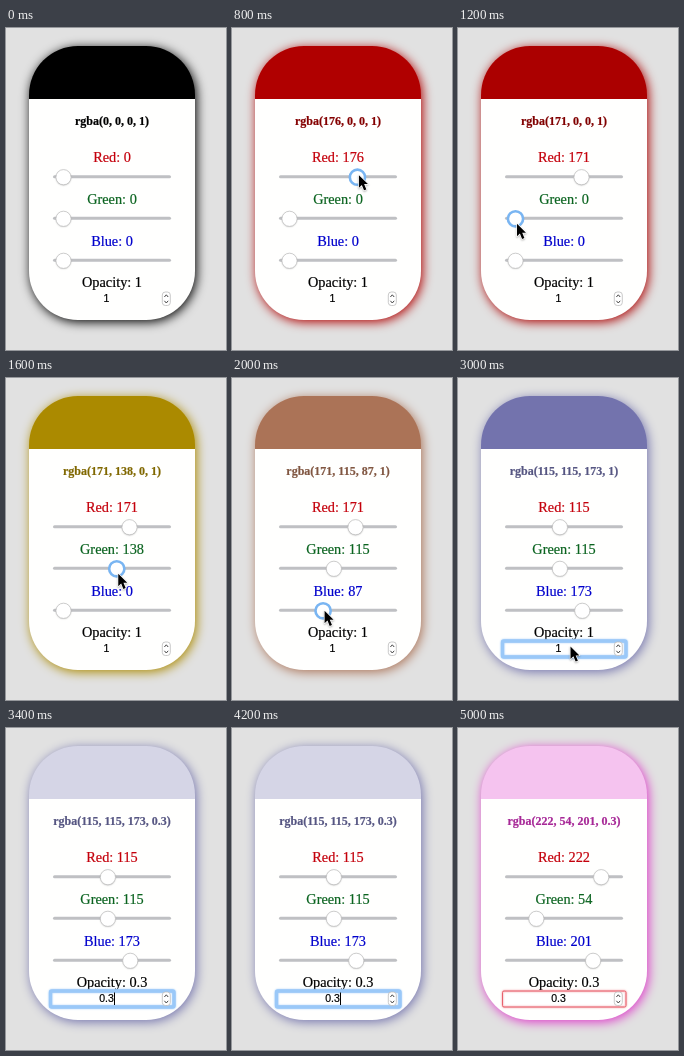
Recreate the animation shown at these times as an HTML page with a canvas. Size 220 px wide and 322 px high, loop 5200 ms.

```html
<!DOCTYPE html>
<html lang="en">
<head>
<meta charset="utf-8">
<title>Colour mixer</title>
<style>
html, body { margin: 0; width: 100%; height: 100%; overflow: hidden; background: #e1e1e1; }
canvas { display: block; width: 220px; height: 322px; }
</style>
</head>
<body>
<canvas id="stage"></canvas>
<script>
const LOOP = 5200, STEP = 200;
const TYPING = 3200, SHUFFLE = 4200, END = 5000;
const SERIF = '"Liberation Serif", Times, serif';
const SANS = '"Liberation Sans", Arial, sans-serif';

const canvas = document.getElementById('stage');
const ctx = canvas.getContext('2d');
const ratio = window.devicePixelRatio || 1;
canvas.width = 220 * ratio;
canvas.height = 322 * ratio;
ctx.scale(ratio, ratio);

// grab: where the pointer holds the thumb, below the track
const red = { label: 'Red', y: 148.7, colour: '#c4000c', grab: -2, last: 222 };
const green = { label: 'Green', y: 190.3, colour: '#0b6420', grab: 5, last: 54 };
const blue = { label: 'Blue', y: 232.3, colour: '#0000cc', grab: 0, last: 201 };
const sliders = [red, green, blue];

const drags = [
  { slider: red, from: 200, to: 800, value: 176 },
  { slider: red, from: 800, to: 1000, value: 171 },
  { slider: green, from: 1200, to: 1600, value: 138 },
  { slider: green, from: 1600, to: 1800, value: 115 },
  { slider: blue, from: 1800, to: 2200, value: 173 },
  { slider: red, from: 2200, to: 2400, value: 173 },
  { slider: red, from: 2400, to: 2800, value: 115 },
  ...sliders.map(slider => ({ slider, from: SHUFFLE, to: END, value: slider.last })),
];

const smooth = p => p * p * (3 - 2 * p);
const progress = (t, from, to) => smooth(Math.min(1, Math.max(0, (t - from) / (to - from))));
const thumbX = value => 57.5 + value * 0.386;

const sliderValue = (slider, t) => Math.round(drags
  .filter(drag => drag.slider === slider)
  .reduce((value, drag) => value + (drag.value - value) * progress(t, drag.from, drag.to), 0));

function draggedSlider(t) {
  const drag = drags.findLast(({ from }) => from < t || from === t && t > 200);
  return drag && drag.slider;
}

function text(string, x, y, font, colour) {
  ctx.font = font;
  ctx.fillStyle = ctx.strokeStyle = colour;
  ctx.lineWidth = 0.2;
  ctx.textAlign = 'center';
  ctx.fillText(string, x, y);
  ctx.strokeText(string, x, y);
}

function roundRect(x, y, w, h, r) {
  ctx.beginPath();
  ctx.roundRect(x, y, w, h, r);
}

function withShadow(colour, blur, dx, dy, paint) {
  ctx.save();
  ctx.shadowColor = colour;
  ctx.shadowBlur = blur * ratio;
  ctx.shadowOffsetX = dx * ratio;
  ctx.shadowOffsetY = dy * ratio;
  paint();
  ctx.restore();
}

function card(rgb, alpha) {
  const header = rgb.map(v => Math.round(255 + (v - 255) * alpha));
  const fill = ctx.createLinearGradient(0, 18, 0, 292);
  const edge = 53 / 274;
  fill.addColorStop(0, `rgb(${header})`);
  fill.addColorStop(edge, `rgb(${header})`);
  fill.addColorStop(edge, '#fffffe');
  roundRect(23, 18, 166, 274, 49);
  ctx.fillStyle = fill;
  withShadow(`rgb(${rgb})`, 11, 1.5, 2, () => ctx.fill());
}

function drawSlider({ label, y, colour }, value, focused) {
  text(`${label}: ${value}`, 106, y - 14.5, `14.3px ${SERIF}`, colour);
  roundRect(47, y - 1.5, 118, 3, 1.5);
  ctx.fillStyle = '#bfc0c3';
  ctx.fill();
  ctx.beginPath();
  ctx.arc(thumbX(value), y + 0.5, 7.6, 0, Math.PI * 2);
  ctx.fillStyle = '#fff';
  withShadow('rgba(0,0,0,.25)', 1.5, 0, 0.6, () => ctx.fill());
  ctx.strokeStyle = focused ? '#79b5f2' : '#c2c2c2';
  ctx.lineWidth = focused ? 2.6 : 0.8;
  ctx.stroke();
}

function chevron(y, dir) {
  ctx.beginPath();
  ctx.moveTo(158.4, y);
  ctx.lineTo(160.3, y + 2.2 * dir);
  ctx.lineTo(162.2, y);
  ctx.strokeStyle = '#444';
  ctx.lineWidth = 1;
  ctx.stroke();
}

function fieldRing(colour, width) {
  roundRect(44.5, 263, 123.5, 16, 1.5);
  ctx.fillStyle = '#fff';
  ctx.fill();
  ctx.strokeStyle = colour;
  ctx.lineWidth = width;
  withShadow(colour, 2, 0, 0, () => ctx.stroke());
}

function numberField(value, caret) {
  text(value, 100.5, 274, `10.5px ${SANS}`, '#000');
  if (caret) {
    ctx.fillStyle = '#000';
    ctx.fillRect(108, 264.5, 1, 12.5);
  }
  roundRect(156.3, 264, 8, 13.5, 3);
  ctx.fillStyle = '#fff';
  ctx.fill();
  ctx.strokeStyle = '#bbb';
  ctx.lineWidth = 0.8;
  ctx.stroke();
  chevron(269, -1);
  chevron(272.8, 1);
}

function cursor(x, y) {
  ctx.save();
  ctx.translate(x, y);
  ctx.fillStyle = '#000';
  ctx.strokeStyle = '#fff';
  ctx.lineWidth = 1.4;
  ctx.lineJoin = 'round';
  const arrow = new Path2D('M0.5 0.5V13L3.4 10.3L5.6 15.6L7.9 14.7L5.7 9.4H9.5Z');
  withShadow('rgba(0,0,0,.3)', 2, 0, 1, () => ctx.stroke(arrow));
  ctx.fill(arrow);
  ctx.restore();
}

function draw(now) {
  const t = Math.floor((now % LOOP) / STEP) * STEP;
  const rgb = sliders.map(slider => sliderValue(slider, t));
  const alpha = t < TYPING ? 1 : 0.3;
  const inField = t >= 3000;
  const active = inField ? null : draggedSlider(t);

  ctx.fillStyle = '#e1e1e1';
  ctx.fillRect(0, 0, 220, 322);
  card(rgb, alpha);
  const headingColour = rgb.map(v => Math.round(v * 0.75));
  text(`rgba(${rgb.join(', ')}, ${alpha})`, 106, 97, `bold 12px ${SERIF}`, `rgb(${headingColour})`);
  sliders.forEach((slider, i) => drawSlider(slider, rgb[i], slider === active));
  text(`Opacity: ${alpha}`, 106, 259, `14.3px ${SERIF}`, '#000');

  if (t >= END) fieldRing('#e8616c', 1);
  else if (inField) fieldRing('#9ac8f8', 3.4);
  numberField(alpha, t >= TYPING && t < END);

  if (active) cursor(thumbX(rgb[sliders.indexOf(active)]) + 1, active.y + active.grab);
  else if (inField && t < TYPING) cursor(112, 268);
}

const start = performance.now();
function tick() {
  draw(performance.now() - start);
  requestAnimationFrame(tick);
}
tick();
</script>
</body>
</html>
```
